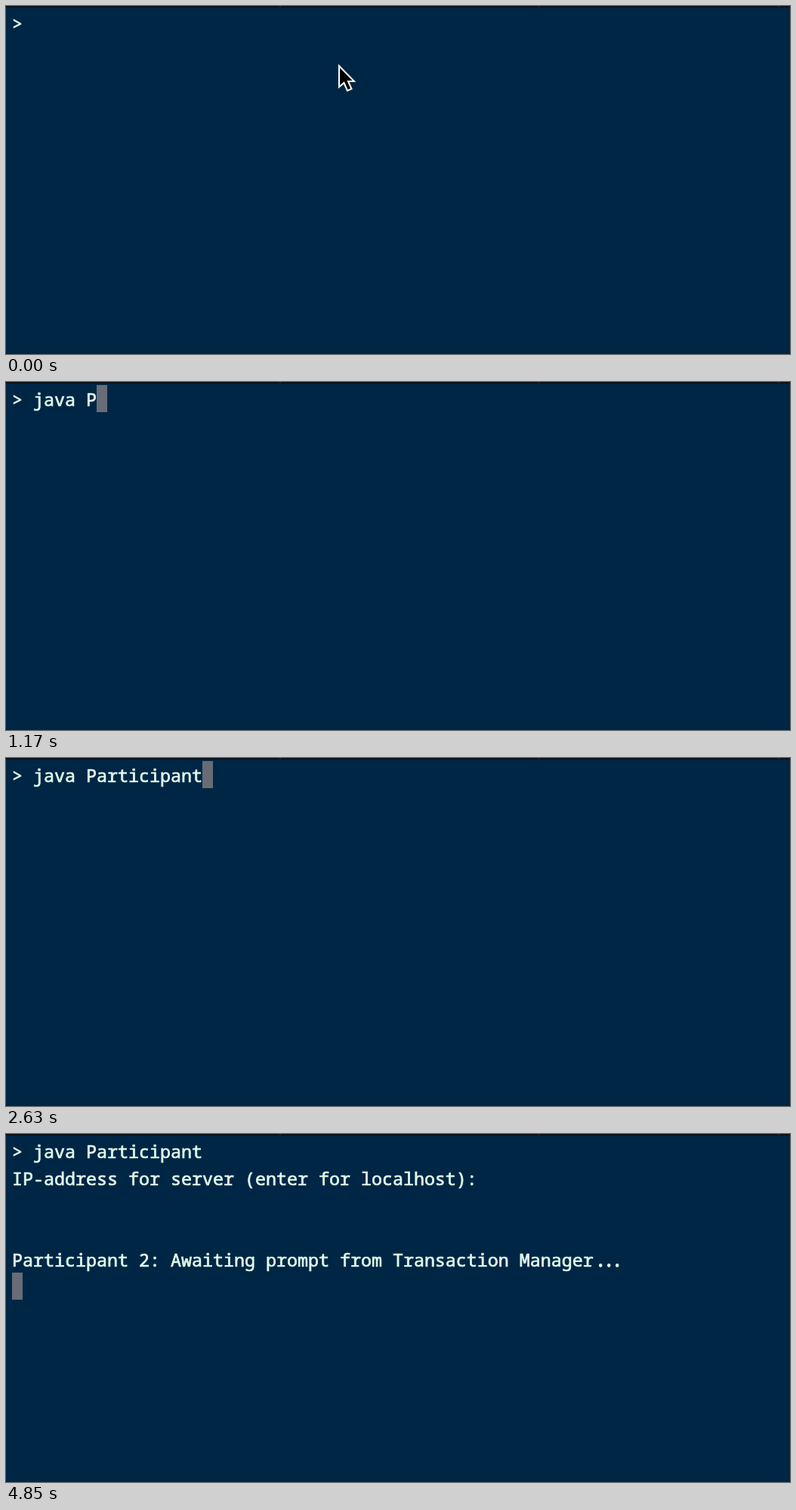
Recreate the animation shown at these times as an HTML page. Size 1038 by 462 pixels, loop 5.45 s.

```html
<!DOCTYPE html>
<html lang="en">
<head>
<meta charset="utf-8">
<title>Terminal</title>
<style>
  html, body { margin: 0; width: 100%; height: 100%; overflow: hidden; background: #002646; }
  svg { display: block; }
  text { font: 23.333px "Noto Sans Mono", monospace; white-space: pre;
         fill: #e2fceb; stroke: #e2fceb; stroke-width: .7px; }
  .dots { letter-spacing: -3px; stroke-width: 1.5px; }
</style>
</head>
<body>
<svg width="1038" height="462" viewBox="0 0 1038 462">
  <rect width="1038" height="462" fill="#002646"/>
  <rect width="1038" height="1.6" fill="#080d12"/>
  <path d="M362 0h2v1h-2zM704 0h2v1h-2z" fill="#30363b"/>
  <rect id="spot" x="1022" width="2" height="1"/>
  <rect id="block" width="14" height="36" fill="#686c76"/>
  <text x="8" y="32" id="command"></text>
  <text x="8" y="68" id="question">IP-address for server (enter for localhost):</text>
  <text x="8" y="176" id="reply">Participant 2: Awaiting prompt from Transaction Manager<tspan class="dots" dx="2.5">...</tspan></text>
  <path id="pointer" d="M441 79.5V107.5L447.5 102L452 112.5L457.5 110L453 100H461Z"
        fill="#000" stroke="#fff" stroke-width="2"/>
</svg>
<script>
const LOOP = 5450, CELL = 14, LINE = 36;
const COMMAND = "java Participant";
const ENTER = 3330, ASK = 3470, CONFIRM = 4270, REPLY = 4330, IDLE = 4850;
// Typing rhythm: [time, keys pressed], even pace in between
const pace = [[530, 1], [930, 5], [1170, 6], [1870, 10], [2630, 16]];

const el = id => document.getElementById(id);
const show = (id, on) => el(id).setAttribute("visibility", on ? "visible" : "hidden");

function keysAt(t) {
  const i = pace.findLastIndex(([at]) => at <= t);
  if (i < 0) return 0;
  const [t0, k0] = pace[i], [t1, k1] = pace[i + 1] || [LOOP, k0];
  return k0 + Math.floor((k1 - k0) * (t - t0) / (t1 - t0));
}

function rowAt(t) {
  if (t < ENTER) return 0;
  if (t < ASK) return 1;
  if (t < CONFIRM) return 2;
  return t < REPLY ? 3 : 5;
}

function draw(t) {
  const keys = keysAt(t), row = rowAt(t);
  const blink = t > ASK && t < IDLE && Math.floor((t - ASK) / 130) % 2;
  el("command").textContent = "> " + COMMAND.slice(0, keys);
  el("block").setAttribute("x", 8 + (row ? 0 : (2 + keys) * CELL));
  el("block").setAttribute("y", 4 + row * LINE);
  el("spot").setAttribute("fill", blink ? "#24292e" : "#383e43");
  show("block", t >= 270);
  show("pointer", t < 500);
  show("question", t >= ASK);
  show("reply", t >= REPLY);
}

const start = performance.now();
function tick() {
  draw((performance.now() - start) % LOOP);
  requestAnimationFrame(tick);
}
tick();
</script>
</body>
</html>
```
